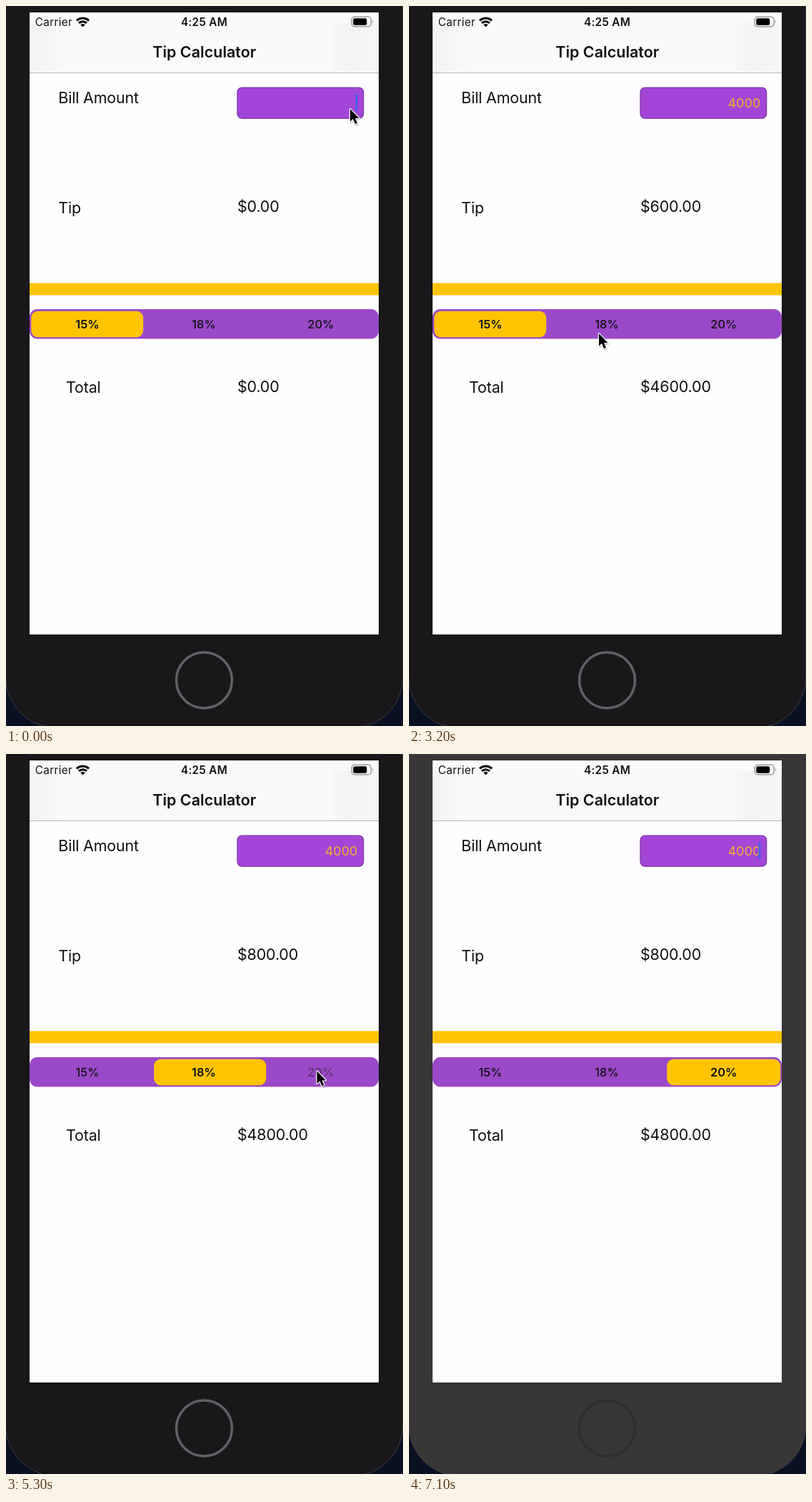
Animation of 556x1007 px, one loop 7200 ms. Source, as an HTML page:

```html
<!DOCTYPE html>
<html lang="en">
<head>
<meta charset="utf-8">
<title>Tip Calculator</title>
<style>
  html, body { margin: 0; width: 100%; height: 100%; overflow: hidden; background: #0a1024; }
  svg { display: block; }
  text { font-family: Inter, Roboto, sans-serif; font-size: 21.5px; letter-spacing: -.2px; fill: #111; }
  .status { font-size: 15.3px; letter-spacing: .3px; }
  .mid { text-anchor: middle; }
  .bold { font-weight: 600; }
  .title { letter-spacing: 0; }
  .segment { font-size: 16.4px; font-weight: 500; letter-spacing: 0; }
  #bill { font-size: 17.7px; letter-spacing: .2px; fill: #f0b72a; text-anchor: end; }
</style>
</head>
<body>
<svg width="556" height="1007" viewBox="0 0 556 1007">
  <defs>
    <linearGradient id="fade">
      <stop offset="0" stop-color="#f3f2f3"/>
      <stop offset="1" stop-color="#fbfafb"/>
    </linearGradient>
    <linearGradient id="haze">
      <stop offset="0" stop-color="#f8f7f8"/>
      <stop offset=".3" stop-color="#f4f3f4"/>
      <stop offset="1" stop-color="#f7f6f7"/>
    </linearGradient>
  </defs>
  <rect id="bezel" x="-.5" y="-200" width="556.5" height="1210" rx="72" stroke="#3c3b40"/>
  <circle id="home" cx="277.5" cy="943" r="39" fill="none" stroke-width="3.5"/>

  <rect x="33" y="9" width="489" height="870" fill="#fffdff"/>
  <rect x="33" y="9" width="489" height="84" fill="#fbfafb"/>
  <rect x="33" y="24" width="52" height="69" fill="url(#fade)"/>
  <rect x="457" y="24" width="65" height="69" fill="url(#haze)"/>
  <rect x="33" y="93" width="489" height="1" fill="#b4b3b5"/>

  <text class="status" x="40.8" y="28">Carrier</text>
  <g fill="none" stroke="#000" stroke-width="3">
    <path d="M98.9 20.4a12.3 12.3 0 0 1 17.2 0M102 23.9a7.8 7.8 0 0 1 11 0"/>
    <path d="M104.4 26.2a4.4 4.4 0 0 1 6.2 0L107.5 29.4Z" fill="#000" stroke="none"/>
  </g>
  <text class="status mid bold" x="277.5" y="28">4:25 AM</text>
  <rect x="484.2" y="15.2" width="27" height="13.6" rx="4" fill="none" stroke="#8b8a8c" stroke-width="1.3"/>
  <rect x="486.3" y="17.2" width="19" height="9.6" rx="2.2"/>
  <path d="M513 19.5q2 2.5 0 5Z" fill="#8b8a8c"/>
  <text class="title mid bold" x="277.8" y="72">Tip Calculator</text>

  <text x="73.3" y="135.5">Bill Amount</text>
  <rect x="324" y="114" width="176.7" height="43.2" rx="6.5" fill="#a346d7" stroke="#7630a4" stroke-width="1.2"/>
  <text id="bill" x="492.4" y="142"></text>
  <rect id="caret" x="489.6" y="123" width="2.8" height="24" rx="1.2" fill="#3f62ea"/>
  <text x="73.3" y="289.5">Tip</text>
  <text id="tip" x="324" y="288"></text>

  <rect x="33" y="387.5" width="489" height="17" fill="#ffc400"/>
  <rect x="33" y="424" width="489" height="41.5" rx="11" fill="#9b49c8"/>
  <rect id="pill" y="426.7" height="36.5" rx="9.5" fill="#ffc400"/>
  <text class="segment mid" x="114" y="451">15%</text>
  <text class="segment mid" x="277" y="451">18%</text>
  <text class="segment mid" x="440.8" y="451">20%</text>

  <text x="84" y="541">Total</text>
  <text id="total" x="324" y="540.3"></text>

  <g id="cursor" stroke-linejoin="round">
    <path d="M0 0V17.5L4 14L7 21L10 19.7L7.1 12.9H12.5Z" transform="translate(.8 1.6)" fill="#0003" stroke="#0002" stroke-width="3"/>
    <path d="M0 0V17.5L4 14L7 21L10 19.7L7.1 12.9H12.5Z" stroke="#fff" stroke-width="2.4" paint-order="stroke"/>
  </g>
</svg>
<script>
const LOOP = 7200, STEP = 100;
const $ = id => document.getElementById(id);
const segments = [...document.querySelectorAll('.segment')];
const rates = [15, 18, 20];

const typed = [300, 1000, 1200, 1500];
const taps = [3700, 5300];
const pointer = [
  [2100, 482, 144], [2800, 300, 348], [3200, 266, 458], [3800, 266, 458],
  [4500, 408, 435.5], [5000, 435.5, 443.5], [6000, 435.5, 443.5], [6200, 470, 560]
];

const clamp = v => Math.min(1, Math.max(0, v));
const smooth = v => (v = clamp(v), v * v * (3 - 2 * v));
const money = v => '$' + v.toFixed(2);
const passed = (times, t) => times.filter(at => t >= at).length;

function pointerAt(t) {
  let [, x, y] = pointer[0];
  for (let i = 1; i < pointer.length; i++) {
    const [from, x0, y0] = pointer[i - 1], [to, x1, y1] = pointer[i];
    if (t < from) break;
    const k = clamp((t - from) / (to - from));
    x = x0 + (x1 - x0) * k;
    y = y0 + (y1 - y0) * k;
  }
  return [x, y];
}

// Solid while typing, then a one second blink with soft edges.
function caretAt(t) {
  if (t < 2100) return 1;
  const phase = (t - 2100) % 1000;
  return phase < 500 ? clamp(1 - phase / 100) : clamp((phase - 400) / 200);
}

function draw(t) {
  const digits = '4000'.slice(0, passed(typed, t));
  const choice = passed(taps, t), bill = +digits, tip = bill * rates[choice] / 100;
  $('bill').textContent = digits;
  $('tip').textContent = money(tip);
  $('total').textContent = money(bill + tip);
  $('caret').setAttribute('opacity', caretAt(t));

  const [first, second] = taps.map(at => smooth((t - at + 60) / 420));
  $('pill').setAttribute('x', 35.2 + 163 * (first + second));
  $('pill').setAttribute('width', 157 + 2 * second);
  const shown = passed(taps.map(at => at + 150), t);
  segments.forEach((label, i) => {
    label.style.fontWeight = i === shown ? 600 : 500;
    const held = i > 0 && t >= taps[i - 1] - 100 && t <= taps[i - 1];
    label.setAttribute('opacity', held ? .45 : 1);
  });

  $('cursor').setAttribute('transform', `translate(${pointerAt(t)})`);
  $('cursor').setAttribute('visibility', t < 6200 ? 'visible' : 'hidden');

  const inactive = t >= 6500;
  $('bezel').setAttribute('fill', inactive ? '#383637' : '#19171a');
  $('home').setAttribute('stroke', inactive ? '#302e30' : '#626064');
}

function tick(now) {
  draw(Math.floor(now % LOOP / STEP) * STEP);
  requestAnimationFrame(tick);
}
tick(performance.now());
</script>
</body>
</html>
```
